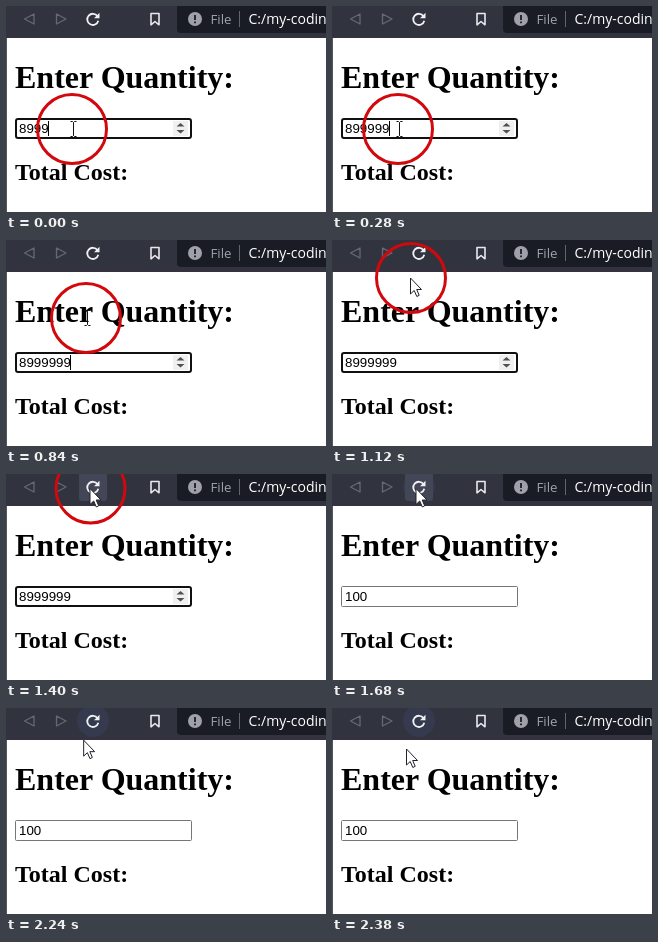
Write an HTML page that moves like this. It is 320 by 206 pixels and loops after 2490 ms.

```html
<!DOCTYPE html>
<html lang="en">
<head>
<meta charset="utf-8">
<title>Quantity form reload</title>
<style>
  html, body { margin: 0; width: 100%; height: 100%; overflow: hidden; background: #fff; }
  svg { display: block; width: 100vw; height: 100vh; }
  .bar { font-family: "Open Sans", "Noto Sans", sans-serif; }
  .page { font-family: "Liberation Serif", "Times New Roman", serif; font-weight: bold; }
  .field { font: 13.333px "Liberation Sans", Arial, sans-serif; }
</style>
</head>
<body>
<svg viewBox="0 0 320 206">
  <rect width="320" height="206" fill="#fff"/>
  <rect y="32" width="1" height="174" fill="#55565e"/>

  <g class="bar">
    <rect width="320" height="32" fill="#31343e"/>
    <rect y="31" width="320" height="1" fill="#3b3042"/>
    <path d="M320 0H171V23Q171 27 175 27H320Z" fill="#191c25"/>
    <circle id="focus" cx="87" cy="13" r="16" fill="#39405a" fill-opacity=".6"/>
    <rect id="hover" x="73" y="-4" width="28" height="31" rx="3" fill="#434657"/>
    <g fill="none" stroke="#666973" stroke-width="1.3" stroke-linejoin="round">
      <path d="M28 8V18L18.500 13Z"/>
      <path d="M50.500 8V18L60 13Z"/>
    </g>
    <path d="M91.500 10.200A5.600 5.600 0 1 0 92.300 14.800" fill="none" stroke="#f1f1f4" stroke-width="1.8"/>
    <path d="M93.500 6.800V12.300H88Z" fill="#f1f1f4"/>
    <path d="M145 7.500H153V18.800L149 15.500L145 18.800Z" fill="none" stroke="#e9e9ed" stroke-width="1.6" stroke-linejoin="round"/>
    <circle cx="189" cy="13" r="7" fill="#a0a1a8"/>
    <path d="M189 9V14M189 15.500V17.300" stroke="#191c25" stroke-width="1.8"/>
    <text x="204.500" y="18" font-size="13.300" fill="#a0a3ab">File</text>
    <path d="M233.500 5V21" stroke="#62656f"/>
    <text x="242.500" y="18" font-size="14" fill="#fff">C:/my-coding</text>
  </g>

  <g class="page">
    <text x="9" y="82" font-size="32">Enter Quantity:</text>
    <text x="9" y="174" font-size="24">Total Cost:</text>
  </g>

  <rect id="box" fill="#fff"/>
  <g id="spinner">
    <rect x="167" y="115" width="15" height="15" fill="#f0f0f0"/>
    <path d="M170.500 120.500L174.500 117L178.500 120.500ZM170.500 124L174.500 127.500L178.500 124Z" fill="#505050"/>
  </g>
  <text id="value" class="field" x="13" y="127"></text>
  <rect id="caret" y="115" width="1" height="15"/>

  <circle id="ring" r="34.500" fill="none" stroke="#d2080c" stroke-width="3"/>
  <path id="beam" d="M-3 -7.500H-1L0 -6.500L1 -7.500H3M0 -6.500V6.500M-3 7.500H-1L0 6.500L1 7.500H3" fill="none" stroke="#111"/>
  <path id="arrow" d="M0 0V16L3.700 12.500L6.300 18.500L8.700 17.300L6.200 11.500H11Z" fill="#fff" stroke="#20202a" stroke-width="1"/>
</svg>
<script>
const LOOP = 2490, STEP = 140;
const el = id => document.getElementById(id);
const show = (id, on) => el(id).setAttribute("visibility", on ? "visible" : "hidden");
const set = (id, attrs) => {
  for (const name in attrs) el(id).setAttribute(name, attrs[name]);
};

// Pointer stops: step, x, y
const stops = [[0, 67, 123], [4, 67, 123], [6, 81, 78], [8, 78.5, 38], [10, 84, 14.5], [14, 84, 14.5], [17, 74.5, 41]];
const digitCounts = [4, 5, 6, 6, 7];

function pointerAt(step) {
  const next = Math.max(1, stops.findIndex(stop => stop[0] >= step));
  const [s0, x0, y0] = stops[next - 1], [s1, x1, y1] = stops[next];
  const k = (step - s0) / (s1 - s0);
  return [x0 + (x1 - x0) * k, y0 + (y1 - y0) * k];
}

function render(time) {
  const step = Math.floor((time % LOOP) / STEP);
  const [x, y] = pointerAt(step);
  const reloaded = step >= 12;
  const overText = step <= 6;
  const digits = digitCounts[Math.min(step, 4)];

  el("value").textContent = reloaded ? "100" : "8".padEnd(digits, "9");
  set("caret", { x: Math.floor(13 + digits * 7.415) });
  show("caret", overText);
  show("spinner", !reloaded);
  set("box", reloaded
    ? { x: 9.5, y: 112.5, width: 176, height: 20, rx: 1, stroke: "#767676", "stroke-width": 1 }
    : { x: 10, y: 113, width: 175, height: 19, rx: 2, stroke: "#101010", "stroke-width": 2 });

  show("hover", y < 27 && x > 73 && x < 101);
  show("focus", reloaded);
  show("ring", !reloaded);
  show("beam", overText);
  show("arrow", !overText);
  set("ring", { cx: x + (overText ? -1 : 0.5), cy: y });
  set("beam", { transform: `translate(${Math.round(x) + 0.5} ${y})` });
  set("arrow", { transform: `translate(${x} ${y})` });
}

function frame() {
  render(performance.now());
  requestAnimationFrame(frame);
}
frame();
</script>
</body>
</html>
```
